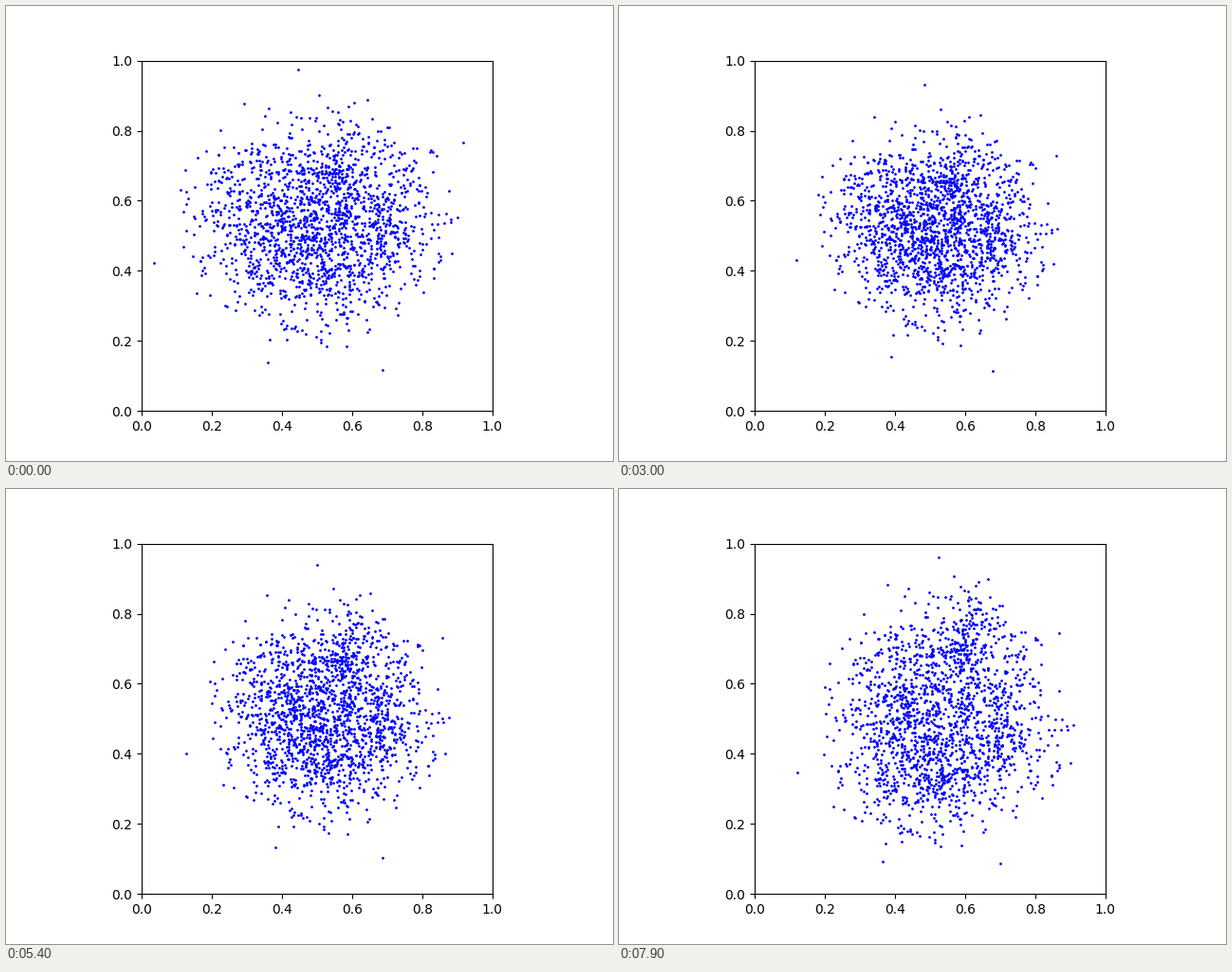
Write a matplotlib script that moves like this. It is 640 by 480 pixels and loops after 8 s.

```python
import numpy as np
import matplotlib.pyplot as plt
from matplotlib.animation import FuncAnimation

FRAMES, STEP = 80, 100
COUNT = 1850
LEFT, BOTTOM, SIDE = 143.2, 427.2, 369.6
CENTRE = [328, 226]

# A few guide particles in pixels: start, position at 3.0 s, position at 7.9 s
GUIDES = np.array([
    [307, 66, 321, 82, 336, 71], [155, 270, 186, 268, 187, 299],
    [482, 143, 461, 157, 464, 151], [476, 222, 462, 234, 479, 248],
    [397, 383, 394, 385, 402, 395], [275, 375, 286, 370, 277, 393],
    [200, 302, 226, 299, 225, 335], [251, 102, 268, 116, 282, 100],
    [358, 142, 360, 155, 371, 131], [330, 300, 334, 297, 332, 326],
], float)

# Spots the particles slowly gather around
CLUMPS = np.array([[278, 208], [362, 150], [328, 285], [388, 258]], float)
PULL, REACH = 0.2, 32


def modes(t):
    """Early contraction and late spreading."""
    return np.array([1 - np.exp(-t / 2), t * t])


def kernel(p, q):
    r2 = ((p[:, None] - q) ** 2).sum(-1) / 1e4
    return r2 * np.log(r2 + 1e-9) / 2


def affine(p):
    return np.column_stack([np.ones(len(p)), p / 100])


def spline(nodes, values, points):
    """Thin-plate interpolation of values at points."""
    a = affine(nodes)
    system = np.block([[kernel(nodes, nodes), a], [a.T, np.zeros((3, 3))]])
    w = np.linalg.solve(system, np.vstack([values, np.zeros((3, 2))]))
    return np.hstack([kernel(points, nodes), affine(points)]) @ w


def gather(p):
    """Pull towards the clumps, fading with distance."""
    d = CLUMPS - p[:, None]
    fade = np.exp(-(d ** 2).sum(-1, keepdims=True) / (2 * REACH ** 2))
    return PULL * (d * fade).sum(1)


def cloud(n, rng):
    """Flat-topped blob with soft edges, cut off at an ellipse."""
    angle = rng.uniform(0, 2 * np.pi, 2 * n)
    radius = np.sqrt(rng.uniform(0, 1, (2 * n, 1)))
    disc = radius * np.column_stack([np.cos(angle), np.sin(angle)])
    p = disc * [92, 78] + rng.normal(size=(2 * n, 2)) * [34, 32]
    inside = ((p / [152, 136]) ** 2).sum(1) < 1
    return p[inside][:n] + CENTRE


start, early, late = GUIDES[:, :2], GUIDES[:, 2:4], GUIDES[:, 4:]
home = np.vstack([start, cloud(COUNT, np.random.default_rng(5))])

# Solve for the two mode fields that carry the guides through their positions
weights = np.linalg.inv([modes(3.0), modes(7.9)])
fields = np.tensordot(weights, [early - start, late - start], axes=1)
flow = np.stack([spline(start, f, home) for f in fields])
flow[1] += gather(home) / 7.9 ** 2

fig, ax = plt.subplots(figsize=(6.4, 4.8), dpi=100)
ax.set_aspect("equal")
ax.set_xlim(0, 1)
ax.set_ylim(0, 1)
dots, = ax.plot([], [], "bo", markersize=1)


def update(i):
    p = home + np.tensordot(modes(i * STEP / 1000), flow, axes=1) + 0.5
    dots.set_data((p[:, 0] - LEFT) / SIDE, (BOTTOM - p[:, 1]) / SIDE)
    return dots,


anim = FuncAnimation(fig, update, frames=FRAMES, interval=STEP,
                     repeat=True, repeat_delay=0)
plt.show()
```
